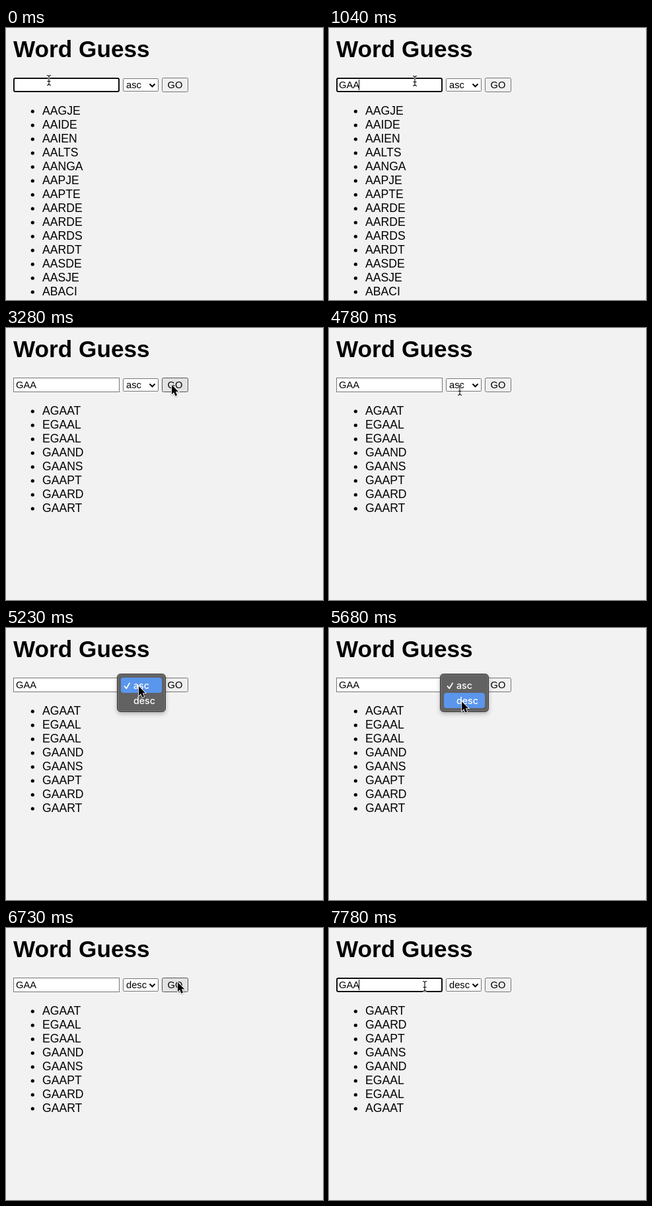
Animation of 480 by 411 pixels, one loop 8000 ms. Source, as an HTML page:

```html
<!DOCTYPE html>
<html lang="en">
<head>
<meta charset="utf-8">
<title>Word Guess</title>
<style>
html, body { margin: 0; width: 100%; height: 100%; overflow: hidden; background: #f2f2f2; }
svg { display: block; width: 480px; height: 411px; cursor: default; }
text { font-family: "Liberation Sans", Arial, sans-serif; font-size: 14.67px; }
h1, .title { font-size: 35.2px; font-weight: bold; }
#list text { font-size: 17.6px; }
#menu text { font: 500 14.2px Inter, sans-serif; fill: #fff; }
.box { fill: #fff; stroke: #767676; }
</style>
</head>
<body>
<svg viewBox="0 0 480 411">
  <defs>
    <filter id="shadow" x="-30%" y="-30%" width="160%" height="160%">
      <feDropShadow dx="0" dy="3" stdDeviation="3" flood-opacity=".25"/>
    </filter>
    <filter id="soft" x="-50%" y="-50%" width="200%" height="200%">
      <feDropShadow dx="0" dy="1" stdDeviation=".8" flood-opacity=".3"/>
    </filter>
  </defs>
  <text class="title" x="11" y="44">Word Guess</text>

  <rect id="field" class="box"/>
  <text id="typed" x="15" y="91"></text>
  <path id="caret" stroke="#000"/>

  <rect class="box" x="177.5" y="76.5" width="53" height="19" rx="1"/>
  <text id="order" x="182" y="91"></text>
  <path d="M217.5 84.5l4 4 4-4" fill="none" stroke="#000" stroke-width="2"/>

  <rect id="button" class="box" x="236.5" y="75.5" width="39" height="21" rx="2"/>
  <text x="244.6" y="91">GO</text>

  <g id="list"></g>

  <g id="menu">
    <rect x="168.5" y="69.5" width="73" height="57" rx="5" fill="#626264" stroke="#333" filter="url(#shadow)"/>
    <rect x="169.5" y="70.5" width="71" height="55" rx="4" fill="none" stroke="#777"/>
    <rect id="mark" x="174" width="62" height="23" rx="4" fill="#5a96ec"/>
    <path d="M179.5 88l2.8 3.4 4.7-8" fill="none" stroke="#fff" stroke-width="1.8" stroke-linecap="round" stroke-linejoin="round"/>
    <text x="193" y="92">asc</text>
    <text x="193" y="115">desc</text>
  </g>

  <path id="arrow" d="M0 0v14.3l3.2-3 2.3 5.4 2.6-1.1-2.3-5.3h4.4z" stroke="#fff" stroke-width="1.6" paint-order="stroke" filter="url(#soft)"/>
  <g id="beam" fill="none">
    <path d="M-3-7.5q3 0 3 2.2v10.6q0 2.2-3 2.2M3-7.5q-3 0-3 2.2M0 5.3q0 2.2 3 2.2M-2.5 1.5h5" stroke="#fff" stroke-width="2.6"/>
    <path d="M-3-7.5q3 0 3 2.2v10.6q0 2.2-3 2.2M3-7.5q-3 0-3 2.2M0 5.3q0 2.2 3 2.2M-2.5 1.5h5" stroke="#000" stroke-width="1.1"/>
  </g>
</svg>
<script>
const LOOP = 8000;
const $ = id => document.getElementById(id);
const set = (id, attrs) => {
  for (const k in attrs) $(id).setAttribute(k, attrs[k]);
};
const show = (id, on) => set(id, { opacity: +on });

const ALL = 'AAGJE AAIDE AAIEN AALTS AANGA AAPJE AAPTE AARDE AARDE AARDS AARDT AASDE AASJE ABACI'.split(' ');
const FOUND = 'AGAAT EGAAL EGAAL GAAND GAANS GAAPT GAARD GAART'.split(' ');
const REVERSED = [...FOUND].reverse();

// Pointer stops: start time, x, y, shape
const STOPS = [
  [0, 65, 79, 'beam'], [1030, 130, 80, 'beam'], [1180, 294, 98, 'arrow'],
  [1330, 284, 95, 'arrow'], [1480, 262, 89, 'arrow'], [1630, 251, 86, 'arrow'],
  [4180, 222, 94, 'arrow'], [4330, 150, 78, 'beam'], [4480, 140, 70, 'beam'],
  [4630, 165, 83, 'beam'], [4780, 198, 94, 'beam'], [4930, 202, 91, 'arrow'],
  [5080, 201, 88, 'arrow'], [5530, 201, 101, 'arrow'], [5680, 201, 111, 'arrow'],
  [6130, 214, 104, 'arrow'], [6280, 246, 90, 'arrow'], [6430, 260, 82, 'arrow'],
  [7480, 205, 84, 'arrow'], [7630, 145, 88, 'beam']
];

function drawList(words) {
  $('list').innerHTML = words.map((word, i) =>
    `<circle cx="40.3" cy="${126 + 21 * i}" r="2.6"/><text x="55" y="${131 + 21 * i}">${word}</text>`).join('');
}

function drawField(t) {
  const focused = t < 1630 || t >= 7780;
  const letters = t < 450 ? 0 : t < 590 ? 1 : t < 890 ? 2 : 3;
  const caretX = [15.5, 26.5, 36.5, 45.5][letters];
  set('field', focused
    ? { x: 12, y: 76, width: 159, height: 20, rx: 2, style: 'stroke:#101010;stroke-width:2' }
    : { x: 11.5, y: 75.5, width: 160, height: 21, rx: 0, style: '' });
  $('typed').textContent = 'GAA'.slice(0, letters);
  set('caret', { d: `M${caretX} 78v16` });
  show('caret', focused && t >= 150);
}

function drawPointer(t) {
  const [, x, y, shape] = STOPS.findLast(s => s[0] <= t);
  for (const id of ['arrow', 'beam']) show(id, id === shape);
  set(shape, { transform: `translate(${x} ${y})` });
  const hover = shape === 'arrow' && x > 236 && x < 276 && y < 97;
  set('button', { style: hover ? 'fill:#e3e3e3;stroke:#555' : 'fill:#efefef' });
}

let shown;
function frame(now) {
  const t = now % LOOP;
  const words = t < 3280 ? ALL : t < 6880 ? FOUND : REVERSED;
  if (words !== shown) drawList(shown = words);
  drawField(t);
  $('order').textContent = t < 5980 ? 'asc' : 'desc';
  set('menu', { opacity: t < 5230 || t >= 6130 ? 0 : t < 5980 ? 1 : 0.4 });
  set('mark', { y: t < 5530 ? 75 : 98 });
  drawPointer(t);
}

const start = performance.now();
function tick() {
  frame(performance.now() - start);
  requestAnimationFrame(tick);
}
tick();
</script>
</body>
</html>
```
